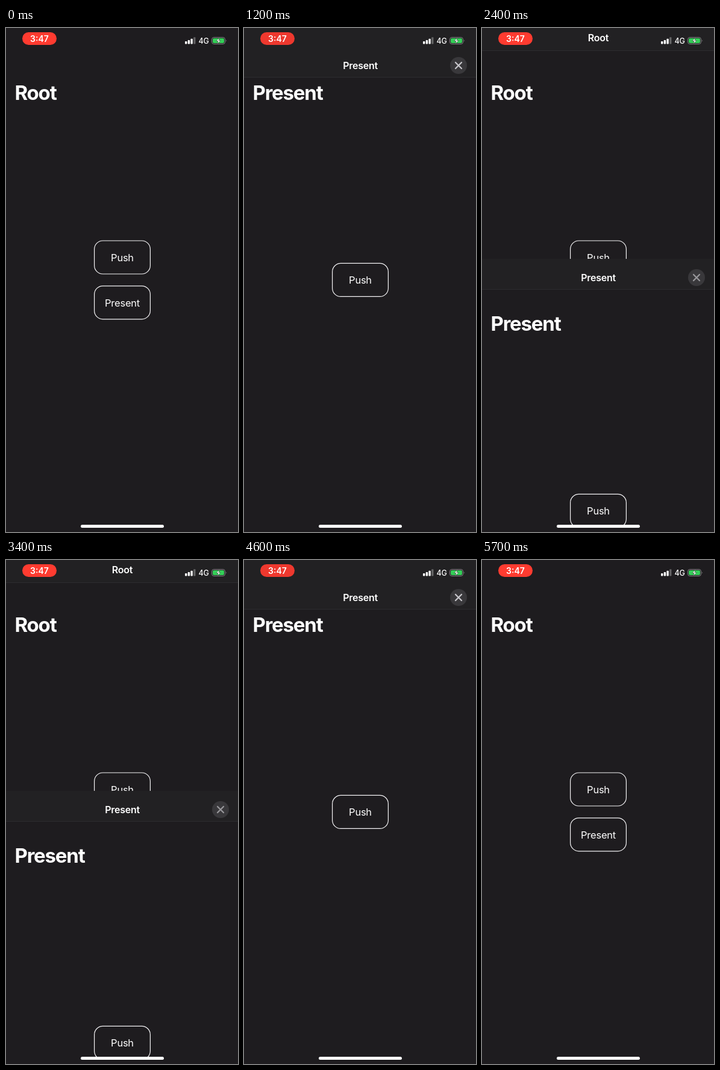
Animation, 385 px wide and 834 px high, one loop 5.8 s. Source, as an HTML page:

```html
<!DOCTYPE html>
<html lang="en">
<head>
<meta charset="utf-8">
<title>Sheet presentation</title>
<style>
  html, body { margin: 0; width: 100%; height: 100%; overflow: hidden; background: #1e1c1f; }
  svg { display: block; width: 385px; height: 834px; }
  text { font-family: Inter, "Open Sans", sans-serif; fill: #fff; }
  .large { font-size: 33px; font-weight: 700; letter-spacing: -1.2px; }
  .label, .bar { text-anchor: middle; letter-spacing: -.25px; }
  .label { font-size: 16.5px; }
  .bar { font-size: 16px; font-weight: 600; }
  .time { font-size: 14px; font-weight: 600; text-anchor: middle; }
  .net { font-size: 12.5px; font-weight: 500; letter-spacing: -.2px; }
  .page { fill: #1e1c1f; }
  .nav { fill: #222123; }
  .rule { fill: #2d2c2f; }
  .outline { fill: none; stroke: #f4f3f5; stroke-width: 1.2; }
</style>
</head>
<body>
<svg viewBox="0 0 385 834">
  <defs>
    <rect id="frame" class="outline" x="146.6" y=".6" width="92.8" height="55" rx="14"/>
  </defs>

  <g id="root">
    <rect class="page" width="385" height="834"/>
    <g id="rootNav" visibility="hidden">
      <rect class="nav" width="385" height="38"/>
      <rect class="rule" y="37" width="385" height="1"/>
      <text class="bar" x="193" y="22">Root</text>
    </g>
    <text class="large" x="14.5" y="119">Root</text>
    <use href="#frame" y="351.4"/>
    <text class="label" x="193" y="386">Push</text>
    <use href="#frame" y="426.2"/>
    <text class="label" x="193" y="460.5">Present</text>
  </g>

  <g id="sheet">
    <rect class="page" width="385" height="834"/>
    <rect id="navFill" class="nav" width="385" height="82"/>
    <g id="nav">
      <rect class="rule" y="81" width="385" height="1"/>
      <text class="bar" x="193" y="67.5">Present</text>
      <circle cx="356" cy="62" r="14" fill="#39383b"/>
      <path id="cross" d="M351 57l10 10m0-10l-10 10" stroke-width="2.3" stroke-linecap="round"/>
    </g>
    <text class="large" x="14.5" y="119">Present</text>
    <use href="#frame" y="388.8"/>
    <text class="label" x="193" y="423">Push</text>
  </g>

  <g id="status">
    <rect id="pill" x="27" y="7" width="57" height="21" rx="10.5"/>
    <text class="time" x="55.5" y="22.5">3:47</text>
    <g fill="#fff">
      <rect x="297" y="22" width="3.4" height="4.5" rx="1"/>
      <rect x="301.7" y="20" width="3.4" height="6.5" rx="1"/>
      <rect x="306.4" y="17.7" width="3.4" height="8.8" rx="1"/>
      <rect x="311.1" y="15.3" width="3.4" height="11.2" rx="1" opacity=".3"/>
    </g>
    <text class="net" x="319.5" y="25.5">4G</text>
    <rect x="341.5" y="15.5" width="22" height="11" rx="3.4" fill="none" stroke="#858487"/>
    <rect x="343" y="17" width="19" height="8" rx="2" fill="#34d058"/>
    <path d="M365 19.2q1.8 1.8 0 3.6z" fill="#858487"/>
    <path d="M354.2 16l-5.4 5.6h3.2l-1.2 4.6 5.4-5.8h-3.3z" fill="#fff" stroke="#1e1c1f" stroke-width=".5"/>
  </g>
  <rect x="124" y="822" width="138" height="5" rx="2.5" fill="#fff"/>
</svg>

<script>
  const LOOP = 5800, STEP = 100, HEIGHT = 834, HELD = 382, INSET = 31;
  const DRAG = [1850, 2350], CANCEL = [3400, 3600];
  const el = id => document.getElementById(id);
  const sheet = el("sheet"), nav = el("nav"), navFill = el("navFill");
  const rootNav = el("rootNav"), cross = el("cross"), pill = el("pill");

  const ramp = (t, [from, to]) => Math.min(1, Math.max(0, (t - from) / (to - from)));
  const smooth = x => x * x * (3 - 2 * x);

  // Share of the way left in a critically damped spring.
  function springLeft(t, start) {
    const x = Math.max(0, t - start) * 0.0122;
    return (1 + x) * Math.exp(-x);
  }

  function sheetOffset(t) {
    if (t < DRAG[0]) return HEIGHT * springLeft(t, 391);
    if (t < CANCEL[1]) return HELD * (smooth(ramp(t, DRAG)) - smooth(ramp(t, CANCEL)));
    return HEIGHT * (1 - springLeft(t, 4673));
  }

  function draw(t) {
    const y = Math.round(sheetOffset(t));
    const dragging = t >= DRAG[0] && t < CANCEL[1];
    const lift = dragging ? Math.min(INSET, y) : 0;
    sheet.setAttribute("transform", `translate(0 ${y})`);
    nav.setAttribute("transform", `translate(0 ${-lift})`);
    navFill.setAttribute("height", 82 - lift);
    rootNav.setAttribute("visibility", dragging ? "visible" : "hidden");
    cross.setAttribute("stroke", dragging && y > 0 ? "#98979b" : "#c6c5ca");

    const dim = ramp(t, [100, 800]) - ramp(t, [1400, 2300])
              + ramp(t, [3500, 4400]) - ramp(t, [4700, 5500]);
    pill.setAttribute("fill", `rgb(${255 - 17 * dim},${59 - 3 * dim},${48 - 2 * dim})`);
  }

  let start;
  function tick(now) {
    start ??= now;
    const t = (now - start) % LOOP;
    draw(Math.floor(t / STEP) * STEP);
    requestAnimationFrame(tick);
  }
  draw(0);
  requestAnimationFrame(tick);
</script>
</body>
</html>
```
